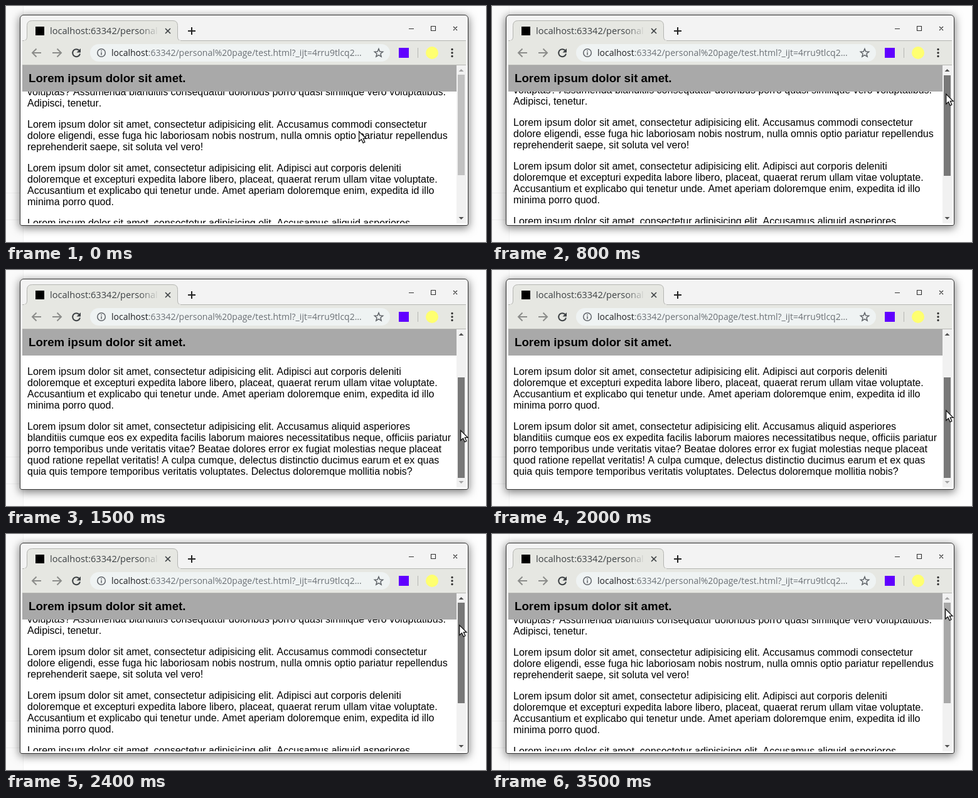
Animation, 765 px wide and 378 px high, one loop 3.6 s. Source, as an HTML page:

```html
<!DOCTYPE html>
<html lang="en">
<head>
<meta charset="utf-8">
<title>Sticky header scroll</title>
<style>
html, body { margin: 0; width: 100%; height: 100%; overflow: hidden; background: #fefefe }
#stage { position: relative; width: 765px; height: 378px; overflow: hidden }
#stage > * { position: absolute }
.side { left: 0; top: 0; width: 27px; height: 378px; background: #fafafa; border-right: 1px solid #f1f1f1 }
.side i { position: absolute; left: 0; width: 28px; height: 1px; background: #efefef }
.window {
  left: 22px; top: 14px; width: 713px; height: 336px; border: 1px solid #333;
  border-radius: 6px 6px 3px 3px; background: linear-gradient(#f3f3f3 80px, #fdfdfd 80px);
  box-shadow: 0 3px 14px 1px rgba(0, 0, 0, .5);
}
svg { left: 0; top: 0; width: 765px; height: 378px }
.ui { font-family: "Open Sans", "Noto Sans", sans-serif; white-space: pre; line-height: 20px }
#tab {
  left: 70px; top: 29px; width: 174px; overflow: hidden; font-size: 14.6px; color: #3c4043;
  -webkit-mask-image: linear-gradient(90deg, #000 82%, transparent);
  mask-image: linear-gradient(90deg, #000 82%, transparent);
}
#url { left: 168px; top: 65px; font-size: 14px; color: #6b7075 }
#url b { font-weight: normal; color: #202124 }
#page {
  left: 26px; top: 95px; width: 692px; height: 253px; overflow: hidden; background: #fff;
  font: 16px/18px "Liberation Sans", Arial, sans-serif; font-kerning: none; white-space: pre;
}
#text { position: absolute; left: 8px; top: 34px }
#text p { margin: 0 0 16px }
#page h3 {
  position: absolute; left: 0; top: 0; width: 682px; height: 22px; margin: 0;
  padding: 10px 0 10px 10px; background: #a9a9a9; font-size: 18.72px; line-height: 21px;
}
</style>
</head>
<body>
<div id="stage">
  <div class="side"><i style="top:299px"></i><i style="top:342px"></i></div>
  <div class="window"></div>

  <svg fill="none">
    <path fill="#e6e7e2" d="M26 55H733V95H26Z"/>
    <path fill="#e6e7e2" stroke="#b4b5b1" d="M26 55.5H28Q33.5 55.5 33.5 49V31.5Q33.5 23.5 41.5 23.5H266Q273.5 23.5 273.5 31.5V49Q273.5 55.5 279 55.5H733"/>
    <path fill="#e6e7e2" d="M29 55H278V57H29Z"/>
    <path stroke="#b4b5b1" d="M26 94.5H733"/>
    <rect x="47" y="33" width="14" height="14" fill="#000"/>
    <g stroke="#3c4043" stroke-width="1.6">
      <path d="M254 36L262 44M262 36L254 44"/>
      <path stroke="#222" stroke-width="2" d="M290 40H302M296 34V46"/>
      <path stroke="#333" stroke-width="1.1" d="M642 36.5H650M677.5 32.5H684.5V39.5H677.5ZM713 33L719 39M719 33L713 39"/>
    </g>
    <g stroke="#8b8c8a" stroke-width="2">
      <path d="M56 75H42M48.5 68.5L42 75L48.5 81.5"/>
      <path d="M74 75H88M81.5 68.5L88 75L81.5 81.5"/>
      <path stroke="#3c4043" d="M116.5 71A6 6 0 1 0 118 76.5"/>
    </g>
    <path fill="#3c4043" d="M119 68V74.5H112.5Z"/>
    <rect x="134" y="61" width="478" height="28" rx="14" fill="#eff3f3"/>
    <g stroke="#5f6368" stroke-width="1.5">
      <circle cx="152" cy="75" r="6.3"/>
      <path d="M152 74V78.5M152 71V72.7"/>
      <path id="star"/>
    </g>
    <rect x="626" y="67" width="16" height="16" fill="#6000ff"/>
    <path stroke="#b5b6b2" d="M656.5 67V83"/>
    <circle cx="679" cy="75" r="10" fill="#ffff70"/>
    <path stroke="#333" stroke-width="3.4" stroke-linecap="round" stroke-dasharray="0 5.5" d="M711 69.5V81"/>
    <path fill="#f1f1f1" d="M718 95H733V348H718Z"/>
    <path id="up" d="M721.5 105L725.5 101L729.5 105Z"/>
    <path id="down" d="M721.5 338L725.5 342L729.5 338Z"/>
    <rect id="thumb" x="720" width="11" height="161"/>
  </svg>

  <div id="tab" class="ui">localhost:63342/personal</div>
  <div id="url" class="ui"><b>localhost</b>:63342/personal%20page/test.html?_ijt=4rru9tlcq2…</div>

  <div id="page">
    <div id="text"><p>voluptas? Assumenda blanditiis consequatur doloribus porro quasi similique vero voluptatibus.
Adipisci, tenetur.</p><p>Lorem ipsum dolor sit amet, consectetur adipisicing elit. Accusamus commodi consectetur
dolore eligendi, esse fuga hic laboriosam nobis nostrum, nulla omnis optio pariatur repellendus
reprehenderit saepe, sit soluta vel vero!</p><p>Lorem ipsum dolor sit amet, consectetur adipisicing elit. Adipisci aut corporis deleniti
doloremque et excepturi expedita labore libero, placeat, quaerat rerum ullam vitae voluptate.
Accusantium et explicabo qui tenetur unde. Amet aperiam doloremque enim, expedita id illo
minima porro quod.</p><p>Lorem ipsum dolor sit amet, consectetur adipisicing elit. Accusamus aliquid asperiores
blanditiis cumque eos ex expedita facilis laborum maiores necessitatibus neque, officiis pariatur
porro temporibus unde veritatis vitae? Beatae dolores error ex fugiat molestias neque placeat
quod ratione repellat veritatis! A culpa cumque, delectus distinctio ducimus earum et ex quas
quia quis tempore temporibus veritatis voluptates. Delectus doloremque mollitia nobis?</p></div>
    <h3>Lorem ipsum dolor sit amet.</h3>
  </div>

  <svg><path id="cursor" fill="#fff" stroke="#111" stroke-width="1.3" d="M.7 1V17L4.5 13.5L7.2 19.3L9.9 18L7.3 12.3H12Z"/></svg>
</div>
<script>
const LOOP = 3600, STEP = 100, MAX_SCROLL = 97, TRAVEL = 62;
const el = id => document.getElementById(id);
const set = (id, name, value) => el(id).setAttribute(name, value);
const clamp = (v, lo, hi) => Math.min(hi, Math.max(lo, v));

const linear = p => p, easeIn = p => p * p, easeOut = p => p * (2 - p), easeInOut = p => p * p * (3 - 2 * p);

// Pointer stops: reach the scrollbar, drag down, rest, drag back up
const stops = [
  { t: 100, x: 562, y: 200 },
  { t: 700, x: 722, y: 135, ease: easeInOut },
  { t: 1000, x: 728, y: 182, ease: easeIn },
  { t: 1500, x: 724, y: 256, ease: easeOut },
  { t: 1700, x: 724, y: 256, ease: linear },
  { t: 2200, x: 721, y: 168, ease: easeIn },
  { t: 2600, x: 722, y: 121, ease: linear },
  { t: 2800, x: 722, y: 119, ease: easeIn }
];

function pointerAt(t) {
  const i = stops.findIndex(s => s.t > t);
  if (i < 1) return stops.at(i);
  const a = stops[i - 1], b = stops[i], p = b.ease((t - a.t) / (b.t - a.t));
  const mix = k => Math.round(a[k] + (b[k] - a[k]) * p);
  return { x: mix('x'), y: mix('y') };
}

// Constant speed down, then a slower one back up
const scrollAt = t => Math.round(clamp(Math.min((t - 791) * .335, (2404 - t) * .26), 0, MAX_SCROLL));

const starPoint = (_, i) => {
  const r = i % 2 ? 3.1 : 7, a = i * Math.PI / 5;
  return `${594 + r * Math.sin(a)} ${75.5 - r * Math.cos(a)}`;
};
set('star', 'd', `M${Array.from({ length: 10 }, starPoint).join('L')}Z`);

function draw(now) {
  const t = Math.floor(now % LOOP / STEP) * STEP;
  const { x, y } = pointerAt(t), scroll = scrollAt(t);
  const pressed = t >= 700 && t < 3500, hover = x >= 719;
  const arrow = atEnd => atEnd ? '#a3a3a3' : '#505050';
  set('cursor', 'transform', `translate(${x} ${y})`);
  el('text').style.top = `${34 - scroll}px`;
  set('thumb', 'y', 110 + Math.floor(scroll * TRAVEL / MAX_SCROLL));
  set('thumb', 'fill', pressed ? '#787878' : hover ? '#a8a8a8' : '#c1c1c1');
  set('up', 'fill', arrow(scroll === 0));
  set('down', 'fill', arrow(scroll === MAX_SCROLL));
}

const start = performance.now();
function tick() {
  draw(performance.now() - start);
  requestAnimationFrame(tick);
}
tick();
</script>
</body>
</html>
```
